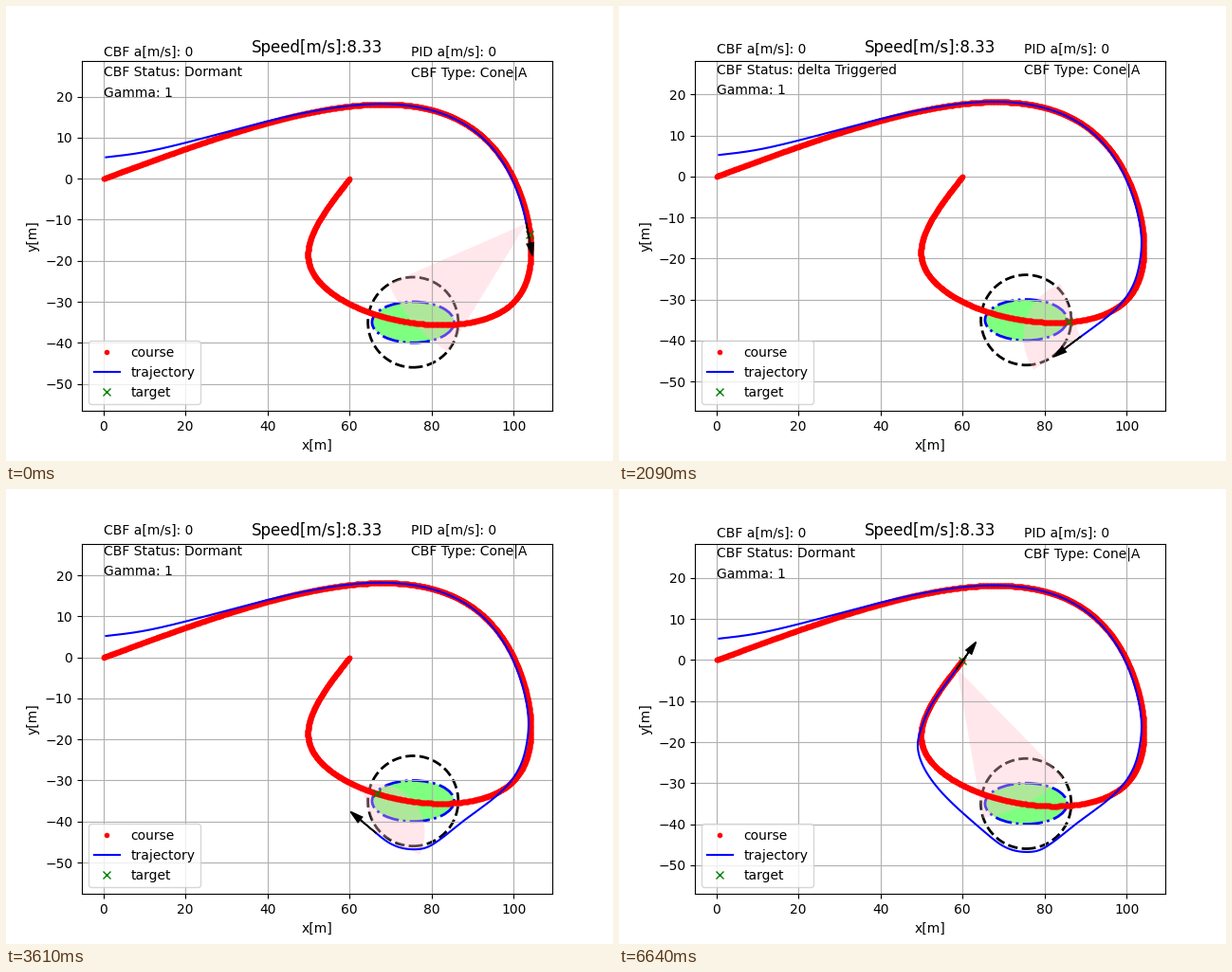
A matplotlib script for the animation above (6.7 s loop, 640 by 480 pixels).

```python
import numpy as np
import matplotlib.pyplot as plt
from matplotlib.animation import FuncAnimation
from matplotlib.patches import Circle, Ellipse, FancyArrow, Wedge

FRAMES, INTERVAL = 134, 50
STEP = 30 / 3.6 * 0.1          # metres travelled per frame
WHEELBASE = 2.9
OBSTACLE, SAFE_R = np.array([75.5, -35.0]), 11.0
TRIGGER_ON, TRIGGER_OFF = 23, 66


def spline(points, ds=0.1):
    """Natural cubic spline through points, parametrised by chord length."""
    p = np.asarray(points, float)
    h = np.hypot(*np.diff(p, axis=0).T)
    knots = np.r_[0, np.cumsum(h)]
    slope = np.diff(p, axis=0) / h[:, None]
    n = len(p)
    A, B = np.eye(n), np.zeros((n, 2))
    for i in range(1, n - 1):
        A[i, i - 1:i + 2] = h[i - 1], 2 * (h[i - 1] + h[i]), h[i]
        B[i] = 3 * (slope[i] - slope[i - 1])
    c = np.linalg.solve(A, B)
    b = slope - h[:, None] * (c[1:] + 2 * c[:-1]) / 3
    d = np.diff(c, axis=0) / (3 * h[:, None])
    s = np.arange(0, knots[-1], ds)
    i = np.clip(np.searchsorted(knots, s, side="right") - 1, 0, n - 2)
    t = (s - knots[i])[:, None]
    return p[i] + b[i] * t + c[i] * t**2 + d[i] * t**3


def arc_length(p):
    return np.r_[0, np.cumsum(np.hypot(*np.diff(p, axis=0).T))]


course = spline([(0, 0), (100, 0), (100, -30), (50, -20), (60, 0)])

# First part: converge onto the course, then cut slightly inside the bend.
s = arc_length(course)
tangent = np.gradient(course, axis=0)
tangent /= np.hypot(*tangent.T)[:, None]
normal = np.column_stack([-tangent[:, 1], tangent[:, 0]])
offset = 4.67 * np.exp(-np.maximum(s - 2.5, 0) / 16) - 0.45 * np.clip((s - 70) / 45, 0, 1)
stop = np.argmax((course[:, 0] > 100) & (course[:, 1] < -6))
approach = (course + normal * offset[:, None])[18:stop:60]

# Second part: detour around the obstacle and back.
START = (103.1, -10.9)
detour = [START, (103.65, -16), (103.2, -21), (101.9, -25.8), (98.9, -30.7),
          (95.2, -34.3), (88, -39.7), (81.2, -45), (78.6, -46.4), (75.6, -46.8),
          (72.5, -46.4), (69.5, -45.1), (66.7, -43), (61, -38.1), (56, -33.4),
          (52.3, -29), (50, -24.9), (49.1, -20.7), (50.2, -15.9), (52.6, -10.6),
          (55.3, -6.7), (59, -1.6)]
path = spline(np.vstack([approach, detour]))
dist = arc_length(path)
s0 = dist[np.argmin(np.hypot(*(path - START).T))]


def at(d):
    return np.array([np.interp(d, dist, path[:, k]) for k in (0, 1)])


fig = plt.figure(figsize=(6.4, 4.8), dpi=100)
ax = fig.add_subplot()
ax.grid(True)
ax.set_xlabel("x[m]")
ax.set_ylabel("y[m]")
ax.set_title("Speed[m/s]:8.33")

x_max, y_max = course.max(axis=0)
ax.set_xlim(-0.05 * x_max, 1.05 * x_max)
half_height = 1.1 * x_max * (0.77 * 480) / (0.775 * 640) / 2

ax.plot(*course.T, ".r", label="course")
trail, = ax.plot([], [], "-b", label="trajectory")
target, = ax.plot([], [], "xg", label="target")
ax.legend(loc="lower left")

ax.add_patch(Circle(OBSTACLE, SAFE_R, fc="none", ec="black", ls="--", lw=2))
ax.add_patch(Ellipse(OBSTACLE, 20, 10, fc=(0, 1, 0, 0.5), ec="blue", ls="-.", lw=2))
cone = ax.add_patch(Wedge((0, 0), 1, 0, 1, fc="pink", ec="none", alpha=0.37))
arrow = ax.add_patch(FancyArrow(0, 0, 5, 0, head_width=1.6, head_length=3,
                                fc="black", ec="black", lw=1.2, zorder=3))

ax.text(0, 30, "CBF a[m/s]: 0")
status = ax.text(0, 25, "")
ax.text(0, 20, "Gamma: 1")
ax.text(75, 30, "PID a[m/s]: 0")
ax.text(75, 25, "CBF Type: Cone|A")


def update(i):
    d = min(s0 + STEP * i, dist[-1])
    pos = at(d)
    heading = pos - at(d - 0.4)
    heading /= np.hypot(*heading)

    done = np.vstack([path[dist < d], pos])
    trail.set_data(*done.T)
    front = pos + WHEELBASE * heading
    nearest = course[np.argmin(np.hypot(*(course - front).T))]
    target.set_data([nearest[0]], [nearest[1]])
    arrow.set_data(x=pos[0], y=pos[1], dx=5 * heading[0], dy=5 * heading[1])

    # Collision cone: sector tangent to the safety circle, reaching its centre.
    dx, dy = OBSTACLE - pos
    reach = np.hypot(dx, dy)
    mid = np.arctan2(dy, dx)
    spread = np.arcsin(min(1, SAFE_R / reach))
    edges = np.array([mid - spread, mid + spread])
    cone.set_center(tuple(pos))
    cone.set_radius(reach)
    cone.set_theta1(np.degrees(edges[0]))
    cone.set_theta2(np.degrees(edges[1]))

    # The view is centred on everything drawn so far.
    y_min = min(OBSTACLE[1] - SAFE_R, done[:, 1].min(),
                (pos[1] + reach * np.sin(edges)).min())
    centre = (y_min + y_max) / 2
    ax.set_ylim(centre - half_height, centre + half_height)

    active = TRIGGER_ON <= i < TRIGGER_OFF
    status.set_text("CBF Status: " + ("delta Triggered" if active else "Dormant"))
    return trail, target, arrow, cone, status


anim = FuncAnimation(fig, update, frames=FRAMES, interval=INTERVAL,
                     init_func=lambda: update(0), repeat=True, repeat_delay=0)
plt.show()
```
